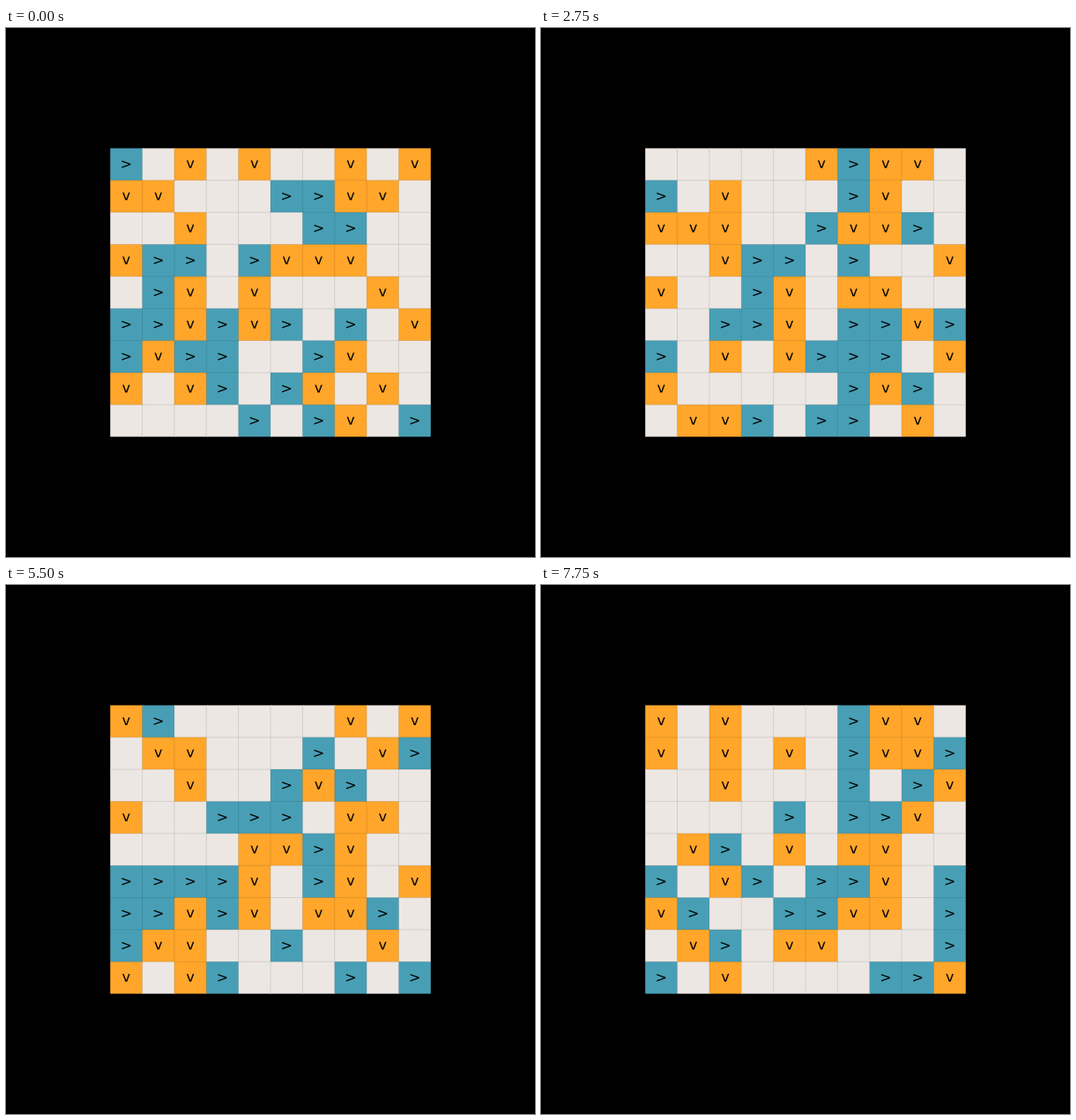
Recreate the animation shown at these times as a matplotlib script. Size 600x600 px, loop 8000 ms.

```python
import matplotlib.pyplot as plt
import numpy as np
from matplotlib.animation import FuncAnimation
from matplotlib.patches import PathPatch, Rectangle
from matplotlib.textpath import TextPath
from matplotlib.transforms import Affine2D

SIZE, DPI = 600, 100
CELL = 400 / 11
FONT_PX = 16
SLOT_MS, SLOTS, HOLD = 250, 32, 1
COLORS = {">": "#489fb5", "v": "#ffa62b", ".": "#ede7e3"}

# Row 0 is drawn at the bottom, so the "v" herd climbs the screen.
START = """
....>.>v.>
v.v>.>v.v.
>v>>..>v..
>>v>v>.>.v
.>v.v...v.
v>>.>vvv..
..v...>>..
vv...>>vv.
>.v.v..v.v
""".split()


def move(grid, herd, axis):
    """Advance every member of a herd whose next cell is free, wrapping round."""
    free = np.roll(grid, -1, axis) == "."
    movers = (grid == herd) & free
    moved = grid.copy()
    moved[movers] = "."
    moved[np.roll(movers, 1, axis)] = herd
    return moved


def centered_glyph(char):
    path = TextPath((0, 0), char, size=FONT_PX, prop={"family": "DejaVu Sans"})
    box = path.get_extents()
    return Affine2D().translate(-(box.x0 + box.x1) / 2,
                                -(box.y0 + box.y1) / 2).transform_path(path)


states = [np.array([list(row) for row in START])]
for _ in range(SLOTS - HOLD - 1):
    states.append(move(move(states[-1], ">", 1), "v", 0))

rows, cols = states[0].shape
left, bottom = (SIZE - cols * CELL) / 2, (SIZE - rows * CELL) / 2
right, top = SIZE - left, SIZE - bottom
glyphs = {kind: centered_glyph(kind) for kind in ">v"}

fig = plt.figure(figsize=(SIZE / DPI, SIZE / DPI), dpi=DPI, facecolor="black")
ax = fig.add_axes([0, 0, 1, 1])
ax.set(xlim=(0, SIZE), ylim=(0, SIZE))
ax.axis("off")

cells = {}
for r, c in np.ndindex(rows, cols):
    x, y = left + c * CELL, bottom + r * CELL
    # Tiles reach one pixel under their neighbours so the background stays hidden.
    tile = ax.add_patch(Rectangle((x, y), min(CELL + 1, right - x),
                                  min(CELL + 1, top - y), lw=0, snap=False, zorder=1))
    center = Affine2D().translate(x + CELL / 2, y + CELL / 2)
    label = ax.add_patch(PathPatch(glyphs["v"], fc="black", lw=0, snap=False, zorder=3,
                                   transform=center + ax.transData))
    cells[r, c] = tile, label

line = dict(color="black", alpha=0.1, lw=0.72, snap=False, zorder=2)
ax.hlines(bottom + CELL * np.arange(rows + 1), left, right, **line)
ax.vlines(left + CELL * np.arange(cols + 1), bottom, top, **line)


def draw(slot):
    grid = states[max(0, slot - HOLD)]
    for pos, (tile, label) in cells.items():
        kind = grid[pos]
        tile.set_facecolor(COLORS[kind])
        label.set_visible(kind in glyphs)
        if kind in glyphs:
            label.set_path(glyphs[kind]) if hasattr(label, "set_path") else None
    return []


anim = FuncAnimation(fig, draw, frames=SLOTS, interval=SLOT_MS,
                     init_func=lambda: draw(0), repeat=True, repeat_delay=0)
plt.show()
```
